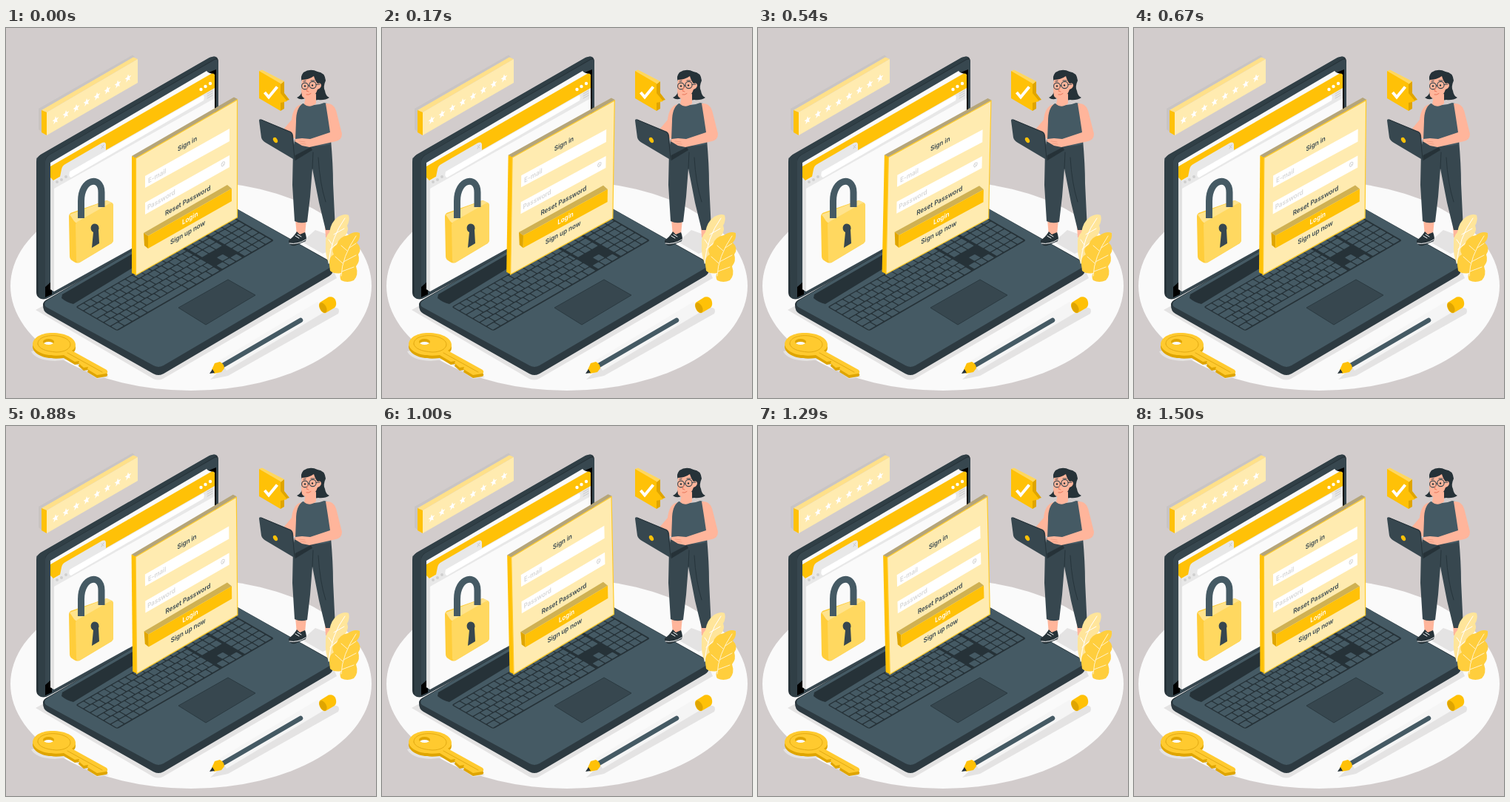
Recreate the animation shown at these times as an HTML page. Size 500 px wide and 500 px high, loop 1.54 s.

```html
<!DOCTYPE html>
<html lang="en">
<head>
<meta charset="utf-8">
<style>
html, body { margin: 0; width: 100%; height: 100%; overflow: hidden; background: #d2cccc; }
svg { display: block; width: 100%; height: 100%; }
text { font: 600 9.2px Inter, Lato, sans-serif; }
.ink { fill: #263238; } .slate { fill: #455a64; } .mid { fill: #37474f; }
.gold { fill: #ffc107; } .deep { fill: #dfa500; } .pale { fill: #ffebb0; }
.skin { fill: #ffb59b; } .white { fill: #fff; } .shade { fill: #e4e3e3; }
.line { fill: none; stroke-linecap: round; stroke-linejoin: round; }
.butt { stroke-linecap: butt; stroke-linejoin: miter; }
</style>
</head>
<body>
<svg viewBox="0 0 500 500">
  <ellipse cx="250" cy="348.500" rx="244" ry="141.500" fill="#fafafa"/>

  <!-- floor shadows -->
  <g class="shade">
    <path d="M40 381L60 370 210 452 440 322 447 338 212 474Q206 477 199 474Z"/>
    <path d="M400 289L418 273 440 281V300L428 305Z"/>
    <path d="M276 475L290 462 440 378Q453 376 449 386L300 470Z"/>
    <path d="M34 437Q40 449 66 450L85 448 123 474 139 472 125 462 60 430Z"/>
  </g>

  <!-- laptop lid -->
  <path class="ink" d="M41 181Q41 175 47 171L275 40Q287 35 287 46V240L58 364Q50 369 44 364 41 362 41 357Z"/>
  <path class="mid" d="M47 171L275 40Q282 37 285 40L57 172Q53 175 53 181V365Q46 367 44 364L41 176Z" opacity=".65"/>
  <path class="mid" d="M53 181Q53 176 58 172L282 43Q287 41 287 48V240L58 364 53 366Z"/>
  <path fill="#000" d="M274 60L284 56V120L274 126ZM53 350L62 342V360L53 364Z"/>
  <path fill="#fafafa" d="M60 182L271 58 273 60 282 63V236L65 356 60 353Z"/>
  <path fill="#e2e2e2" d="M60 188L65 191V356L60 353Z"/>
  <path class="gold" d="M60 187L277 62Q282 60 282 65V82L64 206 60 202Z"/>
  <path fill="#e8e8e8" d="M65 206L73 201 75 191Q76 186 80 184L130 155Q135 153 135 158V165L282 81V95L65 217Z"/>
  <path class="white" d="M86 194L266 91Q269 91 267 98L88 202Q84 202 86 194Z"/>
  <path class="line" stroke="#c9c9c9" d="M129 159L132 162M132 158L129 163M272 89L279 85M272 92L279 88M272 95L279 91"/>
  <g fill="#cfcfcf"><circle cx="69" cy="208" r="2"/><circle cx="75" cy="205" r="2"/><circle cx="81" cy="201" r="2"/></g>
  <g class="white"><circle cx="263.500" cy="83" r="2.200"/><circle cx="269.500" cy="79" r="2.200"/><circle cx="276" cy="75" r="2.200"/></g>

  <!-- padlock -->
  <path fill="#ffcd3a" d="M85 255Q85 250 90 249L136 233 143 236Q145 237 145 241V286Q145 290 141 292L101 316Q97 319 92 316L89 314Q86 312 86 308Z"/>
  <path fill="#ffe38d" d="M86 252L137 233 144 237 99 263Q95 265 92 261Z"/>
  <path fill="#ffd860" d="M94 266Q94 263 98 261L140 237Q145 235 145 241V286Q145 290 141 292L101 316Q95 319 95 313Z"/>
  <path class="line butt" stroke="#455a64" stroke-width="9" d="M101.500 257V234C101.500 203 129 199 129 222V242"/>
  <path class="mid" d="M118 276A5.500 6 0 1 1 125 273L126 291 116 297Z"/>

  <!-- laptop base -->
  <path class="ink" d="M50 374Q50 369 57 366L290 232 436 314Q443 318 442 326 442 332 437 335L213 467Q206 471 199 467L56 386Q50 383 50 374Z"/>
  <path class="slate" d="M54 377Q49 372 57 367L290 232 436 315Q443 320 436 325L213 456Q206 460 199 456Z"/>
  <path class="mid" d="M54 377L199 456Q206 460 213 456L436 325Q441 322 441 318L442 326Q442 332 437 335L213 467Q206 471 199 467L56 386Q50 383 50 374Z" opacity=".4"/>
  <path class="ink" d="M76 360L254 257 268 265 91 373Q82 371 75 365Z"/>
  <g id="keys" transform="matrix(.866 -.5 .866 .5 94 377)"><rect class="ink" width="245" height="65" rx="3"/></g>
  <path class="mid" stroke="#2b3a41" stroke-width="1" d="M233 378L300 340 337 361 270 401Z"/>

  <!-- password bar -->
  <path fill="#c8c4c4" d="M44 109L171 36.500 174 39 48 112V140L44 137Z"/>
  <path fill="#ffe089" d="M48 111L172 39.500 178 42 55 114Z"/>
  <path class="gold" d="M48 111L55 114V145L48 141Z"/>
  <path class="pale" d="M55 114L178 42V74L55 145Z"/>
  <g id="stars" class="white"></g>

  <!-- sign-in card -->
  <g id="card">
    <path fill="#b5a579" d="M170 173L308 93.500 313 96 176 177Z"/>
    <path class="gold" d="M170 173L176 176V334L170 331Z"/>
    <path class="pale" stroke="#ffca28" stroke-width="1.200" d="M175.500 176L312.500 97V256L175.500 334Z"/>
    <path class="white" d="M188 200L302 136V153L188 216ZM188 236L302 172V188L188 252Z"/>
    <path class="line" stroke="#d5d5d5" d="M291 185Q292 180 295.500 181 296 185 292 187ZM293 183.500L294 184.500"/>
    <path fill="#cfb153" d="M186 277L299 212 305 217 192 281Z"/>
    <path class="deep" d="M186 277L192 281V298L187 294Z"/>
    <path class="gold" d="M192 281L305 217V234L192 298Z"/>
    <g id="labels"></g>
  </g>

  <!-- speech bubble -->
  <path class="deep" d="M371 75L376 72V88L383 97 376 99V109L371 112Z"/>
  <path fill="#ffd75e" d="M342 58L346 56.500 376 72 371 76Z"/>
  <path class="gold" d="M342 58L371 75V88L380 99 371 101V112L342 95Z"/>
  <path class="line butt" stroke="#fff" stroke-width="4" d="M349.500 87L355 93.500 366.500 79.500"/>

  <!-- woman -->
  <path class="skin" d="M391 258H406L404 279 393 281ZM431 268H439V283H432Z"/>
  <path class="ink" d="M382 287Q389 282 393 275L397 279 404 276Q407 283 405 288L391 294Q384 295 382 290Z"/>
  <path class="line" stroke="#fff" d="M383 291Q394 293 405 286M391 281L396 284M394 279L399 282"/>
  <path class="mid" d="M390 151H439Q442 185 442 210L445 273 432 273 423 236 414 190 411 228 407 262Q398 265 390 261L387 212 388 165Z"/>
  <path class="line" stroke="#26343b" d="M415 168L414 190M422 175Q424 210 432 235"/>
  <path class="skin" d="M400 103Q388 105 386 124L375 137 378 147 394 150 402 120Z"/>
  <path class="slate" d="M401 102Q417 107 430 101 438 102 440 111L438 157Q414 164 391 151L392 126Q392 108 401 102Z"/>
  <path class="ink" d="M400 72Q397 66 402 60 411 54 421 59 431 60 432 71 428 80 431 85 432 92 437 94 431 98 422 97 412 99 404 95 398 98 393 94 398 92 400 86Z"/>
  <path class="skin" d="M405 92L419 89 419 102Q410 109 403 103Z"/>
  <path class="skin" d="M400 70Q409 70 416 65 418 72 421 75 426 73 426 78 425 82 421 83 418 92 411 96 403 97 400 92Q398 81 400 70Z"/>
  <g class="line" stroke="#37474f" stroke-width="1.100">
    <circle cx="404" cy="78.500" r="4.400"/><circle cx="414.500" cy="77" r="4.600"/>
    <path d="M408.500 78H410M419 76.500L424 76M402 72L405 71.500M412 71L417 71"/>
  </g>
  <path class="line" stroke="#e8775c" d="M408 80L406 85 409 86M406 90Q409 91 412 88.500"/>
  <circle class="ink" cx="404" cy="78.500" r="1.200"/><circle class="ink" cx="414" cy="77.500" r="1.200"/>
  <path class="ink" d="M387 174L412 161 414 165 391 179Z"/>
  <path class="mid" d="M342 125Q342 122 346 124L385 140Q388 142 388 145L391 178 388 177 351 155Q346 152 345 148Z"/>
  <path class="line" stroke="#263238" d="M345 124L385 141Q387 143 387 146L390 177"/>
  <ellipse class="gold" cx="364" cy="151.500" rx="2.700" ry="4" transform="rotate(-30 364 151.500)"/>
  <path class="skin" d="M432 102Q444 101 447 115L454 143Q454 151 446 153L410 161 400 159 390 153 391 150 400 149 411 150 438 141 435 121Z"/>
  <path class="line" stroke="#ed9b80" stroke-width=".8" d="M396 153L404 154M398 156L405 157"/>

  <!-- leaves -->
  <path fill="#ffe59a" d="M436 318Q431 306 432 292 431 282 437 276 439 262 449 255 458 250 463 253 465 260 461 267 464 274 458 281 458 290 451 296 451 308 439 320Z"/>
  <path class="line" stroke="#fff" d="M436 318Q439 283 458 257M438 299L451 288M436 286L441 293M443 279L457 271"/>
  <path fill="#ffce3d" d="M437 320Q436 309 443 306 438 298 447 293 450 282 462 280 471 274 478 277 479 285 474 290 482 298 476 306 479 315 473 322 477 334 470 341 461 345 453 341 450 336 453 331 443 333 438 328Z"/>
  <path class="line" stroke="#fff3cc" d="M453 335Q454 309 473 281M455 318L445 309M456 316L473 307M454 329L470 323M461 301L453 294M464 297L473 291"/>

  <!-- pencil -->
  <path fill="#f5f5f5" d="M289 449L421 370 430 384 298 463Z"/>
  <path class="line" stroke="#455a64" stroke-width="6.500" d="M293 456L398 395"/>
  <path class="gold" d="M278 462L282 453 289 451Q295 454 295 460L291 465 281 467Z"/>
  <path class="ink" d="M275 467L279 461 282 466Z"/>
  <path class="gold" d="M424 371L436 363.500Q442 362 445 367 448 374 444 378L432 385Q427 386 424 379 422 374 424 371Z"/>
  <ellipse class="deep" cx="428.500" cy="378" rx="4.200" ry="7.500" transform="rotate(-28 428.500 378)"/>

  <!-- key -->
  <defs>
    <path id="key" fill-rule="evenodd" d="M36 427C37 417 50 411 66 412 83 413 94 420 94 428 94 432 92 434 89 436L136 462Q139 466 135 467L123 469 110 461 111 458 105 459 98 453 99 450 93 451 78 442C55 445 37 438 36 427ZM50 424A7.500 4 0 0 0 65 424 7.500 4 0 0 0 50 424Z"/>
  </defs>
  <use href="#key" y="4" class="deep"/>
  <use href="#key" fill="#ffca2f"/>
  <path class="line" stroke="#e2aa12" d="M43 427C42 416 64 413 77 418 94 424 88 438 68 438 53 437 44 433 43 427M83 439L130 465"/>
</svg>
<script>
const byId = id => document.getElementById(id);
const add = (parent, tag, attrs, content = '') => {
  const node = document.createElementNS('http://www.w3.org/2000/svg', tag);
  for (const name in attrs) node.setAttribute(name, attrs[name]);
  node.textContent = content;
  parent.append(node);
};
const wall = (x, y) => `matrix(.866 -.5 0 1 ${x} ${y})`;

const label = (content, x, y, fill = '#37474f') =>
  add(byId('labels'), 'text', { transform: wall(x, y), fill }, content);
label('Sign in', 232, 167);
label('E-mail', 192, 210, '#d6d6d6');
label('Password', 191, 246, '#d6d6d6');
label('Reset Password', 215, 254);
label('Login', 238, 266, '#fff');
label('Sign up now', 222, 293);

const key = (x, row, width = 9.4) =>
  add(byId('keys'), 'rect', { class: 'slate', x, y: 1.5 + row * 10.5, width, height: 9, rx: 1 });
for (let row = 0; row < 6; row++) {
  const shift = row % 3 * 3;
  if (row < 5) {
    key(1.5, row, 9.4 + shift);
    for (let i = 1; i < 14; i++) key(1.5 + i * 10.8 + shift, row);
    key(152.7 + shift, row, 9.4 - shift);
  } else {
    for (let i = 0; i < 4; i++) key(1.5 + i * 12, row, 10.6);
    key(49.5, row, 62);
    for (let i = 0; i < 4; i++) key(113 + i * 12.5, row, 11);
  }
  for (let i = 0; i < 3; i++)
    if (row < 3 || row === 5 || (row === 4 && i === 1)) key(166 + i * 10.8, row);
  for (let i = 0; i < 4; i++) key(201 + i * 10.8, row);
}

const star = Array.from({ length: 10 }, (_, i) => {
  const angle = i * Math.PI / 5, radius = i % 2 ? 2.3 : 5.3;
  return [radius * Math.sin(angle), -radius * Math.cos(angle)];
}).join(' ');
for (let i = 0; i < 8; i++)
  add(byId('stars'), 'polygon', { points: star, transform: wall(67 + i * 14, 124.5 - i * 8.1) });

// Linear sway: rest, right at a quarter, left at three quarters, rest.
const LOOP = 1540, SWAY = 2;
function draw(now) {
  const phase = now % LOOP / LOOP;
  const sway = phase < .25 ? phase * 4 : phase < .75 ? 2 - phase * 4 : phase * 4 - 4;
  byId('card').setAttribute('transform', `rotate(${SWAY * sway} 243 214)`);
  requestAnimationFrame(draw);
}
draw(performance.now());
</script>
</body>
</html>
```
